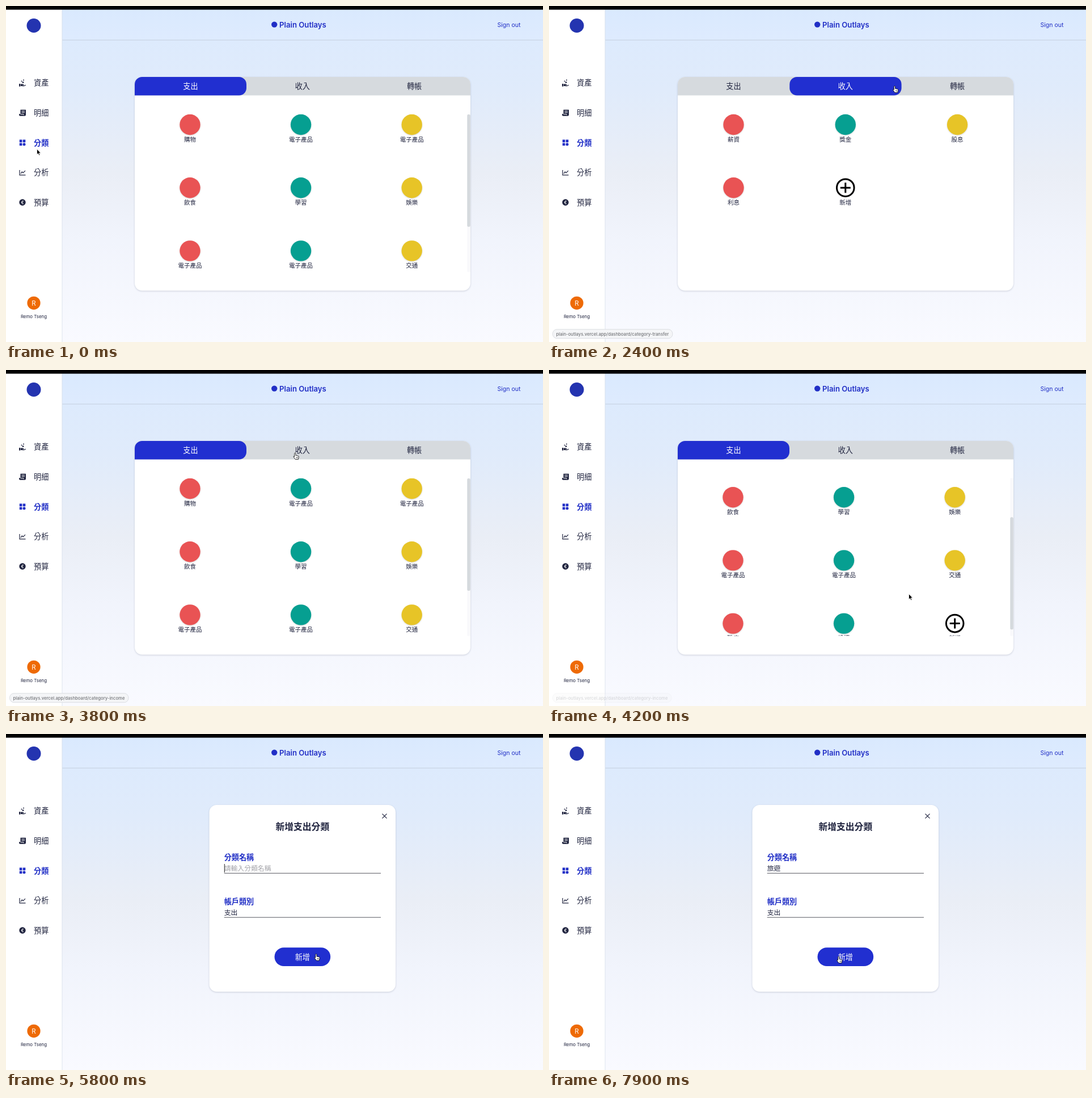
Write an HTML page that moves like this. It is 947 px wide and 592 px high and loops after 8000 ms.

```html
<!DOCTYPE html>
<html lang="zh-Hant">
<head>
<meta charset="utf-8">
<title>Plain Outlays</title>
<style>
html, body { margin: 0; width: 100%; height: 100%; overflow: hidden; background: #fff; }
svg { display: block; width: 100%; height: 100%; }
text { font-family: Inter, "Noto Sans CJK TC", "Noto Sans CJK", sans-serif; fill: #20243f; }
.mid { text-anchor: middle; }
.blue { fill: #212fc6; }
.white { fill: #fff; }
.bold { font-weight: 600; }
.medium { font-weight: 500; }
.grey { fill: #a3a3a8; }
.card { fill: #fff; filter: drop-shadow(0 1.5px 1.5px rgba(40, 50, 80, .2)); }
.dot { filter: drop-shadow(0 1px 1px rgba(0, 0, 0, .16)); }
.icon { fill: #20243f; }
.icon.on { fill: #212fc6; }
.line { fill: none; stroke: #20243f; stroke-width: 1.2; }
.add { fill: none; stroke: #000; stroke-width: 3; }
.rule { stroke: #55575f; stroke-width: 1; }
</style>
</head>
<body>
<svg id="stage" viewBox="0 0 947 592"></svg>
<script>
const LOOP = 8000, STEP = 100;
const BLUE = '#212fd0', RED = '#e95354', TEAL = '#069f91', YELLOW = '#e7c427';
const stage = document.getElementById('stage');

// Text is placed by its left edge or middle and its vertical centre.
const text = (x, cy, size, str, cls = '') =>
  `<text x="${x}" y="${cy + size * .37}" font-size="${size}" class="${cls}">${str}</text>`;

const NAV = [
  ['資產', '<path d="M-6 1.5h2.4v4.6h-2.4zM-3 1.8h3l2.6 1.2q.8 1-.6 1.2h-2v.5h2.8l2-1.3q1.6-.4 1.3.8L2.5 6-3 5.4z"/><circle cx="1" cy="-1" r="1.4"/><circle cx="-1.5" cy="-3" r="1"/><circle cx="2" cy="-5" r="1"/>'],
  ['明細', '<path d="M-3.5-5.5h9.5v9q0 2-2 2h-8q-2 0-2-2v-1.5h2.5z"/><path d="M-1.5-3h5.5M-1.5-.5h5.5M-3.5 2.5H2V4" stroke="#fff" fill="none"/>'],
  ['分類', '<path d="M-5.2-5.2h4.6v4.6h-4.6zM.7-5.2h4.6v4.6H.7zM-5.2.7h4.6v4.6h-4.6z"/><circle cx="3" cy="3" r="2.5"/>'],
  ['分析', '<path class="line" d="M-5-4.5v9H5.5M-3 2L-.8-1.2 1.2.6 5-3.2"/>'],
  ['預算', '<circle r="5.7"/><text class="mid white bold" font-size="7.5" y="2.8">€</text>']
];

const nav = NAV.map(([label, icon], i) => {
  const y = 135.6 + 52.6 * i, on = i === 2;
  return `<g class="icon ${on ? 'on' : ''}" transform="translate(29 ${y})">${icon}</g>` +
    text(49, y, 13.15, label, on ? 'blue bold' : '');
}).join('');

const item = (label, x, y, color) =>
  (label === '新增'
    ? `<path class="add" d="M${x - 15.3} ${y}a15.3 15.3 0 0 1 30.6 0a15.3 15.3 0 0 1-30.6 0M${x - 9} ${y}h18M${x} ${y - 9}v18"/>`
    : `<circle class="dot" cx="${x}" cy="${y}" r="18.2" fill="${color}"/>`) +
  text(x, y + 26, 10.52, label, 'mid');

const grid = (labels, left, pitch) => labels.split(' ').map((label, i) =>
  item(label, left + pitch * (i % 3), 209 + 111.2 * Math.floor(i / 3), [RED, TEAL, YELLOW][i % 3])).join('');

const TABS = ['支出', '收入', '轉帳'];
const TAB_SHAPES = [
  'M227 157.6V138a13 13 0 0 1 13-13H411a13 13 0 0 1 13 13v6.6a13 13 0 0 1-13 13z',
  'M437.3 125H608.600a13 13 0 0 1 13 13v6.6a13 13 0 0 1-13 13H437.3a13 13 0 0 1-13-13V138a13 13 0 0 1 13-13z',
  'M634.500 125H806a13 13 0 0 1 13 13v19.6H634.500a13 13 0 0 1-13-13V138a13 13 0 0 1 13-13z'
];
const EXPENSES = '購物 電子產品 電子產品 飲食 學習 娛樂 電子產品 電子產品 交通 醫療 投資 新增';

const pane = (active, content) => `<g class="pane">
  <rect class="card" x="227" y="125" width="592" height="376.5" rx="13"/>
  <path d="M227 157.6V138a13 13 0 0 1 13-13H806a13 13 0 0 1 13 13v19.6z" fill="#d6dade"/>
  <path d="${TAB_SHAPES[active]}" fill="${BLUE}"/>
  ${TABS.map((tab, i) => text(325.5 + 197.3 * i, 141.5, 13.15, tab, i === active ? 'mid white' : 'mid')).join('')}
  ${content}</g>`;

const field = (label, y) => text(384.7, y, 13.15, label, 'blue bold') +
  `<path class="rule" d="M384.700 ${y + 27.8}H661"/>`;

const modal = `<g class="pane">
  <rect class="card" x="358.5" y="125" width="328.500" height="329" rx="13"/>
  <path class="line" d="M663.500 140.700l8 8m0-8l-8 8"/>
  ${text(522.8, 163.2, 15.8, '新增支出分類', 'mid bold')}
  ${field('分類名稱', 217.5)}${field('帳戶類別', 295.3)}
  <text id="entry" x="384.700" y="241.200" font-size="11.84"></text>
  <path id="compose" stroke="#20243f" stroke-width=".8"/>
  <rect id="caret" y="229" width="1" height="15" fill="#222"/>
  ${text(384.7, 314.3, 11.84, '支出')}
  <rect x="473.500" y="376.200" width="98.700" height="32.800" rx="16.400" fill="${BLUE}"/>
  ${text(522.8, 392.7, 13.15, '新增', 'mid white medium')}</g>`;

stage.innerHTML = `
<defs>
  <linearGradient id="sky" x2="0" y2="1">
    <stop stop-color="#dbeafe"/><stop offset=".25" stop-color="#e0ebfb"/>
    <stop offset=".5" stop-color="#eaeef6"/><stop offset=".7" stop-color="#f1f4fc"/>
    <stop offset="1" stop-color="#f9faff"/>
  </linearGradient>
  <linearGradient id="head" x2="0" y2="1">
    <stop stop-color="#d9e9fe"/><stop offset="1" stop-color="#deebfe"/>
  </linearGradient>
  <clipPath id="list"><rect x="227" y="190.500" width="586" height="278"/></clipPath>
</defs>
<rect width="947" height="592" fill="url(#sky)"/>
<rect x="99" width="848" height="60" fill="url(#head)"/>
<path d="M99 60H947" stroke="#c3cedd"/>
<rect width="98.700" height="592" fill="#fff"/>
<path d="M99 0V592" stroke="#d9e0ea" stroke-width=".8"/>
<rect width="947" height="6.500" fill="#000"/>
<circle cx="49" cy="34.500" r="12.500" fill="#2434b0"/>
<circle class="blue" cx="473.200" cy="32.600" r="5.200"/>
${text(482, 32.7, 13.15, 'Plain Outlays', 'blue bold')}
${text(866.5, 33, 10.52, 'Sign out', 'blue')}
${nav}
<circle cx="49" cy="523.300" r="11.600" fill="#ee6a05"/>
${text(49, 523.4, 11.5, 'R', 'mid white')}
${text(49, 547, 7.9, 'Remo Tseng', 'mid')}
${pane(0, `<g clip-path="url(#list)"><g id="scroller">${grid(EXPENSES, 324.5, 195.6)}</g></g>
  <rect x="813.300" y="190.500" width="5.500" height="278" fill="#f9f9fb"/>
  <rect id="thumb" x="813.300" y="191" width="5.500" height="198" rx="2.500" fill="#d5d9dd"/>`)}
${pane(1, grid('薪資 獎金 股息 利息 新增', 325.5, 197.3))}
${pane(2, grid('帳戶互轉 債券 轉定存 投資買賣 新增', 325.5, 197.3))}
${modal}
<g id="bubble">
  <rect id="pill" x="6.500" y="569.700" height="16" rx="7.500" fill="#f4f5f7" stroke="#d3d6db" stroke-width=".8"/>
  <text id="address" x="12.500" y="580.500" font-size="7.700" font-weight="500" style="fill:#74767a"></text>
</g>
<path id="pointer" stroke-linejoin="round"/>`;

const [entry, compose, caret, scroller, thumb, bubble, pill, address, pointer] =
  ['entry', 'compose', 'caret', 'scroller', 'thumb', 'bubble', 'pill', 'address', 'pointer']
    .map(id => document.getElementById(id));
const panes = [...document.querySelectorAll('.pane')];

// [time, x, y] of the pointer tip
const PATH = [
  [0, 54.5, 252], [100, 54.5, 252], [900, 215, 214], [1400, 316, 170], [1500, 316, 170],
  [1700, 339, 143], [1800, 339, 143], [2100, 515, 142], [2200, 515, 142], [2600, 704, 140],
  [2700, 704, 140], [3000, 520, 86], [3200, 342.5, 134], [3500, 342.5, 134], [3800, 510, 146],
  [4100, 634.5, 394.5], [4200, 634.5, 394.5], [4500, 716, 434], [4700, 716, 434],
  [4800, 722.8, 442.5], [5100, 537, 276], [5300, 494.5, 247.5], [5500, 494.5, 247.5],
  [5600, 497, 238], [5800, 547, 387.5], [7400, 547, 387.5], [7600, 511.5, 394], [7700, 510.7, 392]
];
const SCROLL = [[4000, 0], [4100, 50], [4200, 96], [4300, 110]];
const VIEWS = [[0, 0], [2200, 1], [2700, 2], [3500, 0], [4700, 3]];
const ENTRIES = [[0, '請輸入分類名稱'], [6800, 'ㄌ'], [6900, 'ㄌㄩ'], [7000, '旅'],
  [7100, '旅ㄧ'], [7200, '旅ㄧㄡ'], [7300, '旅遊']];
const LINKS = [[1900, 2100, 'expense'], [2100, 2400, 'income'], [2400, 2800, 'transfer'],
  [3200, 3700, 'expense'], [3700, 3900, 'income']];
const SHAPES = {
  arrow: ['M0 0V9.800L2.200 7.800 3.900 11.300 5.500 10.600 3.900 7.200H6.900z', '#000', '#fff'],
  hand: ['M-1.200 1.200a1.100 1.100 0 0 1 2.200 0V4.500l4 .8q1.500.4 1.300 2L5.300 11.600H.4L-2.800 7.200q-.6-1.400.6-1.200l1 .8zM2.300 7.500v2M4 7.500v2', '#fff', '#000'],
  beam: ['M-2-5.500Q0-5.500 0-4.500V4.500Q0 5.500-2 5.500M2-5.500Q0-5.500 0-4.500M0 4.500Q0 5.500 2 5.500', 'none', '#222']
};

const latest = (list, t) => list.filter(k => k[0] <= t).pop();

function along(keys, t) {
  const a = latest(keys, t) || keys[0], b = keys.find(k => k[0] > t);
  const f = b && t > a[0] ? (t - a[0]) / (b[0] - a[0]) : 0;
  return a.slice(1).map((v, i) => b ? v + (b[i + 1] - v) * f : v);
}

function pointerKind(x, y, view) {
  const inside = (l, t, r, b) => x > l && x < r && y > t && y < b;
  if (view < 3) return inside(227, 125, 819, 157) || inside(699, 416, 732, 448) && view === 0 ? 'hand' : 'arrow';
  if (inside(473, 376, 572, 409)) return 'hand';
  return inside(385, 229, 661, 245) ? 'beam' : 'arrow';
}

function drawPointer(t, view) {
  const [x, y] = along(PATH, t);
  const [d, fill, stroke] = SHAPES[pointerKind(x, y, view)];
  const set = { d, fill, stroke, 'stroke-width': .8, transform: `translate(${x} ${y})` };
  for (const name in set) pointer.setAttribute(name, set[name]);
  pointer.style.display = t >= 6200 && t < 7600 ? 'none' : '';
}

function drawBubble(t) {
  const link = latest(LINKS, t);
  const opacity = link ? Math.min(1, Math.max(0, 1 - (t - link[1]) / 400)) : 0;
  bubble.style.opacity = opacity;
  if (!opacity) return;
  address.textContent = `plain-outlays.vercel.app/dashboard/category-${link[2]}`;
  pill.setAttribute('width', address.getComputedTextLength() + 12.5);
}

function drawEntry(t) {
  const [start, value] = latest(ENTRIES, t);
  const length = start ? value.length : 0;
  entry.textContent = value;
  entry.setAttribute('class', start ? '' : 'grey');
  const composing = start && t < 7400;
  compose.setAttribute('d', composing ? `M385 243.300h${11.8 * length}` : '');
  caret.setAttribute('x', 384.8 + 11.7 * length);
  const on = t >= 5600 && t < 6100 || t >= 6600 && t < 7900;
  caret.style.display = on ? '' : 'none';
}

function draw(now) {
  const t = Math.floor(now % LOOP / STEP) * STEP;
  const view = latest(VIEWS, t)[1];
  panes.forEach((p, i) => p.style.display = i === view ? '' : 'none');
  const [scroll] = along(SCROLL, t);
  scroller.setAttribute('transform', `translate(0 ${-scroll})`);
  thumb.setAttribute('y', 191 + scroll * .71);
  drawEntry(t);
  drawBubble(t);
  drawPointer(t, view);
}

const begin = performance.now();
function tick() {
  draw(performance.now() - begin);
  requestAnimationFrame(tick);
}
tick();
</script>
</body>
</html>
```
